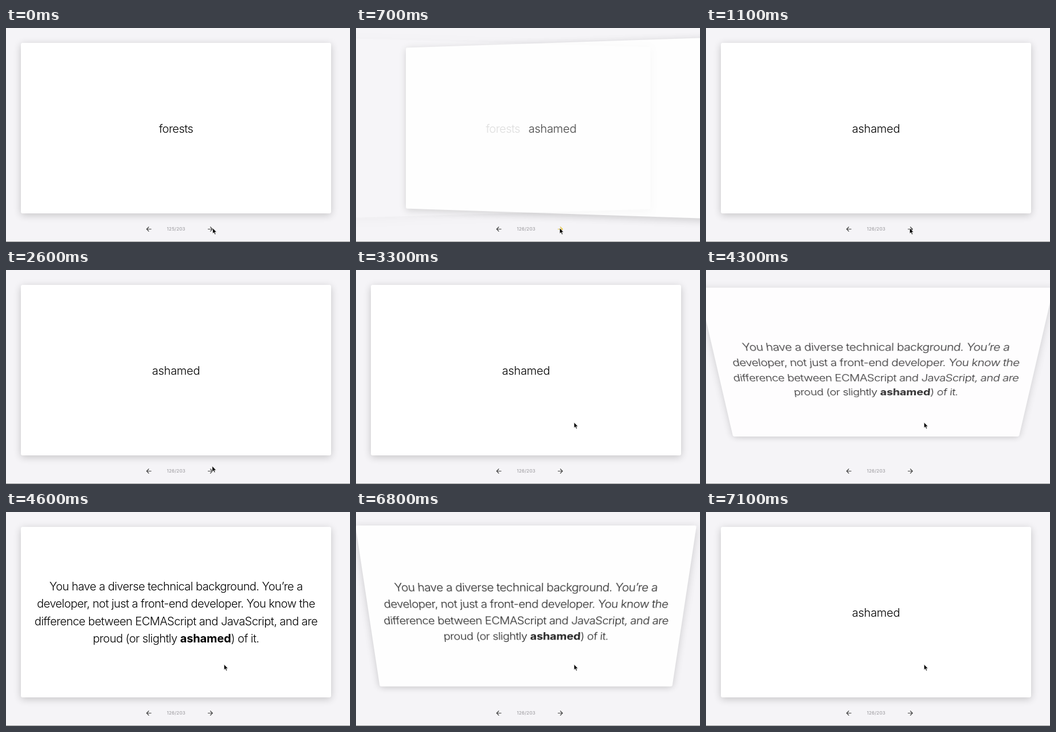
Recreate the animation shown at these times as an HTML page. Size 600 by 374 pixels, loop 7900 ms.

```html
<!DOCTYPE html>
<html lang="en">
<head>
<meta charset="utf-8">
<title>Flash cards</title>
<style>
html, body { margin: 0; width: 100%; height: 100%; overflow: hidden; background: #f5f4f7; }
#stage { position: absolute; left: 0; top: 0; width: 600px; height: 374px; overflow: hidden; background: #f5f4f7; }
.card {
  position: absolute; left: 26px; top: 26px; width: 541px; height: 297.5px;
  box-sizing: border-box; padding-top: 2px;
  display: flex; align-items: center; justify-content: center;
  background: #fff; border-radius: 3px; box-shadow: 0 3px 14px rgba(0, 0, 0, .2);
  font: 300 20px/30.5px Inter, "Open Sans", sans-serif; letter-spacing: -.25px;
  color: #000; text-align: center; white-space: nowrap; backface-visibility: hidden;
}
#back { letter-spacing: -.55px; }
#back b { font-weight: 700; letter-spacing: -.1px; }
#old { letter-spacing: -.5px; }
svg { position: absolute; left: 0; top: 0; }
#count { font: 500 8px Inter, sans-serif; letter-spacing: .15px; fill: #a2a1a5; }
.arrow { fill: none; stroke: #444; stroke-width: 1.2; }
</style>
</head>
<body>
<div id="stage">
  <div class="card" id="back"><div>You have a diverse technical background. You’re a<br>developer, not just a front-end developer. You know the<br>difference between ECMAScript and JavaScript, and are<br>proud (or slightly <b>ashamed</b>) of it.</div></div>
  <div class="card" id="front"><div>ashamed</div></div>
  <div class="card" id="old"><div>forests</div></div>
  <svg width="600" height="374" viewBox="0 0 600 374">
    <path class="arrow" d="M253.5 351.5H245.5M249.3 347.5L245.3 351.5L249.3 355.5"/>
    <path class="arrow" id="next" d="M352 351.5H360M356.2 347.5L360.2 351.5L356.2 355.5"/>
    <text id="count" x="296.7" y="354" text-anchor="middle">125/203</text>
    <rect y="373" width="600" height="1" fill="#999"/>
    <path id="cursor" d="M0 0V9.6L2.2 7.6L3.8 11.2L5.3 10.5L3.8 7.1H6.8Z" fill="#000" stroke="#fff" stroke-width=".6"/>
  </svg>
</div>
<script>
const LOOP = 7900, STEP = 100;
const SHIFT = 86, TURN = 14.4;
const $ = id => document.getElementById(id);
const back = $('back'), front = $('front'), old = $('old');
const next = $('next'), count = $('count'), cursor = $('cursor');

const ramp = (t, start, length) => Math.min(1, Math.max(0, (t - start) / length));
const ease = x => x * x * (3 - 2 * x);
const mix = (a, b, x) => a + (b - a) * x;

function pose(card, opacity, transform) {
  card.style.visibility = opacity > 0 ? 'visible' : 'hidden';
  card.style.opacity = opacity;
  card.style.transform = transform;
}

// slide sideways; side is -1 (left) to 1 (right)
const slide = side => side
  ? `perspective(600px) translateX(${SHIFT * side}px) rotateY(${-TURN * side}deg)`
  : 'none';

// flip over the horizontal axis, swelling a little midway
const flip = (angle, p) =>
  `perspective(740px) scale(${1 + .04 * Math.sin(Math.PI * p)}) rotateX(${angle}deg)`;

function drawCards(t) {
  const move = ease(ramp(t, 350, 733)), fade = ease(ramp(t, 350, 455));
  const turn = t < 5500 ? ease(ramp(t, 4030, 370)) : 1 - ease(ramp(t, 6715, 385));
  pose(old, 1 - fade, slide(-move));
  if (turn === 0) {
    pose(front, fade, slide(1 - move));
    pose(back, 0, 'none');
  } else {
    pose(front, 1 - turn, flip(180 * turn, turn));
    pose(back, turn, turn === 1 ? 'none' : flip(180 * (turn - 1), turn));
  }
}

function drawControls(t) {
  const lit = t < 400 ? 0 : 1 - ramp(t, 700, 400);
  const channel = hi => Math.round(mix(68, hi, lit));
  next.style.stroke = `rgb(${channel(228)},${channel(196)},${channel(64)})`;
  count.textContent = (t < 400 ? 125 : 126) + '/203';

  const go = ramp(t, 2450, 850);
  const x = mix(360.5, 355.3, ramp(t, 0, 200)) + 25 * go;
  const y = mix(349.7, 266.3, ease(go));
  cursor.setAttribute('transform', `translate(${x} ${y})`);
}

function frame() {
  const t = Math.floor(performance.now() % LOOP / STEP) * STEP;
  drawCards(t);
  drawControls(t);
  requestAnimationFrame(frame);
}
frame();
</script>
</body>
</html>
```
